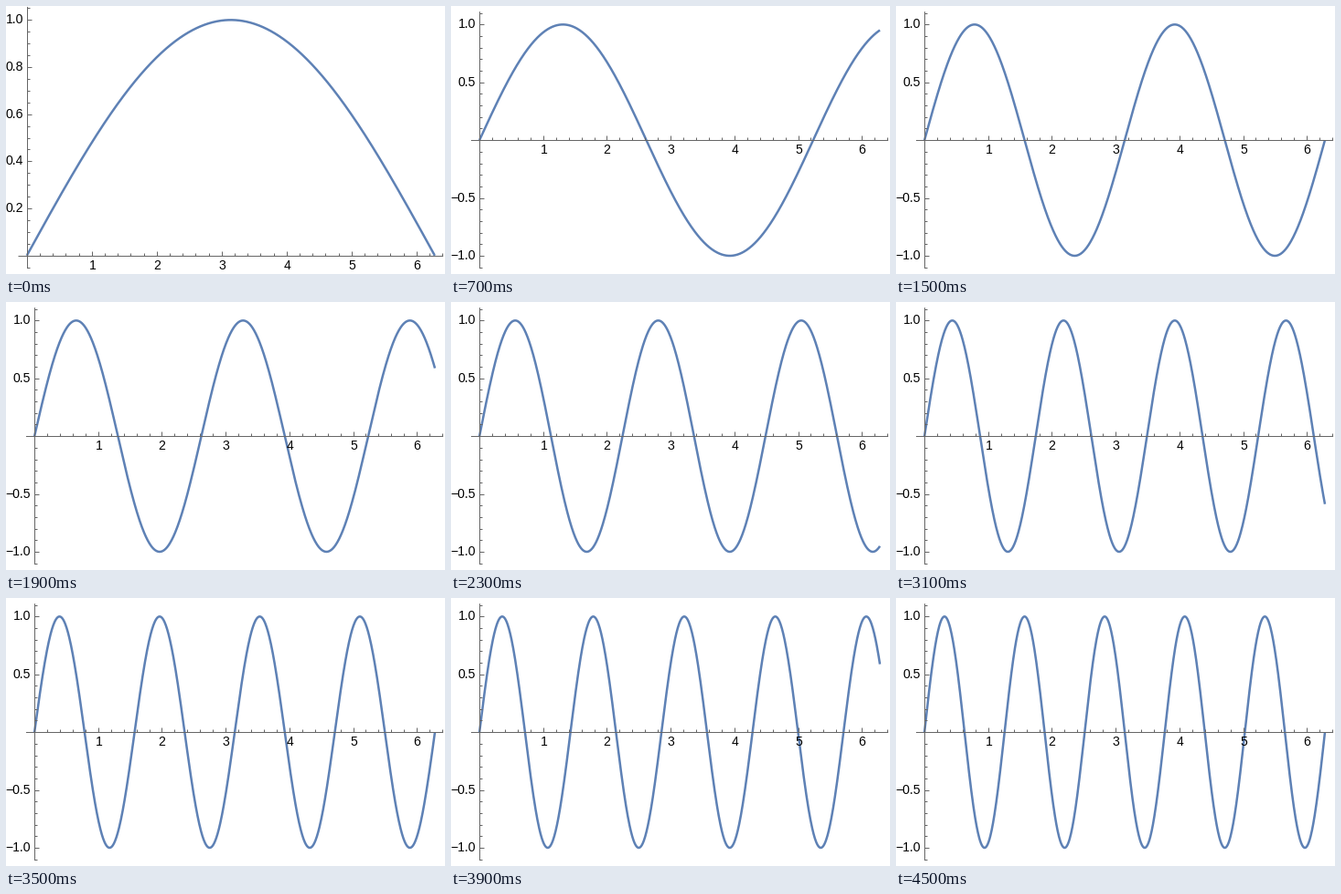
A matplotlib script that plays this animation: 480 px wide and 294 px high, repeating every 4.6 s.

```python
import math

import numpy as np
import matplotlib.pyplot as plt
from matplotlib.animation import FuncAnimation

W, H, DPI = 480, 294, 100
FRAMES, INTERVAL = 46, 100
PX = 72 / DPI
END = 2 * math.pi
GOLDEN = (1 + math.sqrt(5)) / 2
RIGHT, BOTTOM = 478.1, 288.1
PAD_X, PAD_Y = 0.02, 0.05
CURVE, AXIS = "#5e81b5", "0.4"

plt.rcParams["font.family"] = "Liberation Sans"
fig = plt.figure(figsize=(W / DPI, H / DPI), dpi=DPI, facecolor="white")
ax = fig.add_axes([0, 0, 1, 1])
xs = np.linspace(0, END, 900)


def crisp(v):
    """Centre of the pixel nearest to v."""
    return math.floor(v + 0.5) + 0.5


def ticks(lo, hi, step, per_major):
    """Yield (value, is_major) for every tick in the range except zero."""
    for k in range(math.ceil(lo / step), math.floor(hi / step) + 1):
        if k:
            yield k * step, k % per_major == 0


def label(x, y, text, ha):
    ax.text(x, y, text, ha=ha, va="baseline", fontsize=14 * PX,
            color="black", zorder=4)


def line(x0, y0, x1, y1):
    ax.plot([x0, x1], [y0, y1], color=AXIS, lw=PX, snap=False,
            solid_capstyle="butt", zorder=3)


def draw(i):
    ax.clear()
    ax.axis("off")
    ax.set_xlim(0, W)
    ax.set_ylim(H, 0)
    ax.set_autoscale_on(False)

    ys = np.sin((0.5 + 0.1 * i) * xs)
    positive = i == 0
    low = 0 if positive else ys.min()

    # The plot box keeps the golden ratio; negative labels need more room.
    left = 13.5 if positive else 22.0
    width = RIGHT - left
    height = width / GOLDEN
    top = BOTTOM - height
    ux = width * (1 - 2 * PAD_X) / END
    uy = height * (1 - 2 * PAD_Y) / (1 - low)

    def px(x):
        return left + PAD_X * width + x * ux

    def py(y):
        return top + PAD_Y * height + (1 - y) * uy

    ax.plot(px(xs), py(ys), color=CURVE, lw=2.5 * PX, snap=False,
            solid_capstyle="butt", solid_joinstyle="round", zorder=2)

    ox, oy = crisp(px(0)), crisp(py(0))
    line(left, oy, RIGHT, oy)
    line(ox, top, ox, BOTTOM)

    pad = PAD_X * width / ux
    for v, major in ticks(-pad, END + pad, 0.2, 5):
        x = crisp(px(v))
        line(x, oy, x, oy - (5 if major else 3))
        if major:
            label(x, oy + 14.5, f"{v:.0f}", "center")

    pad = PAD_Y * height / uy
    step, per_major = (0.05, 4) if positive else (0.1, 5)
    for v, major in ticks(low - pad, 1 + pad, step, per_major):
        y = crisp(py(v))
        line(ox, y, ox + (5 if major else 3), y)
        if major:
            label(ox - 4.5, y + 3.5, f"{v:.1f}".replace("-", "\u2212"), "right")
    return []


anim = FuncAnimation(fig, draw, frames=FRAMES, interval=INTERVAL,
                     init_func=lambda: [], repeat=True, repeat_delay=0)
plt.show()
```
